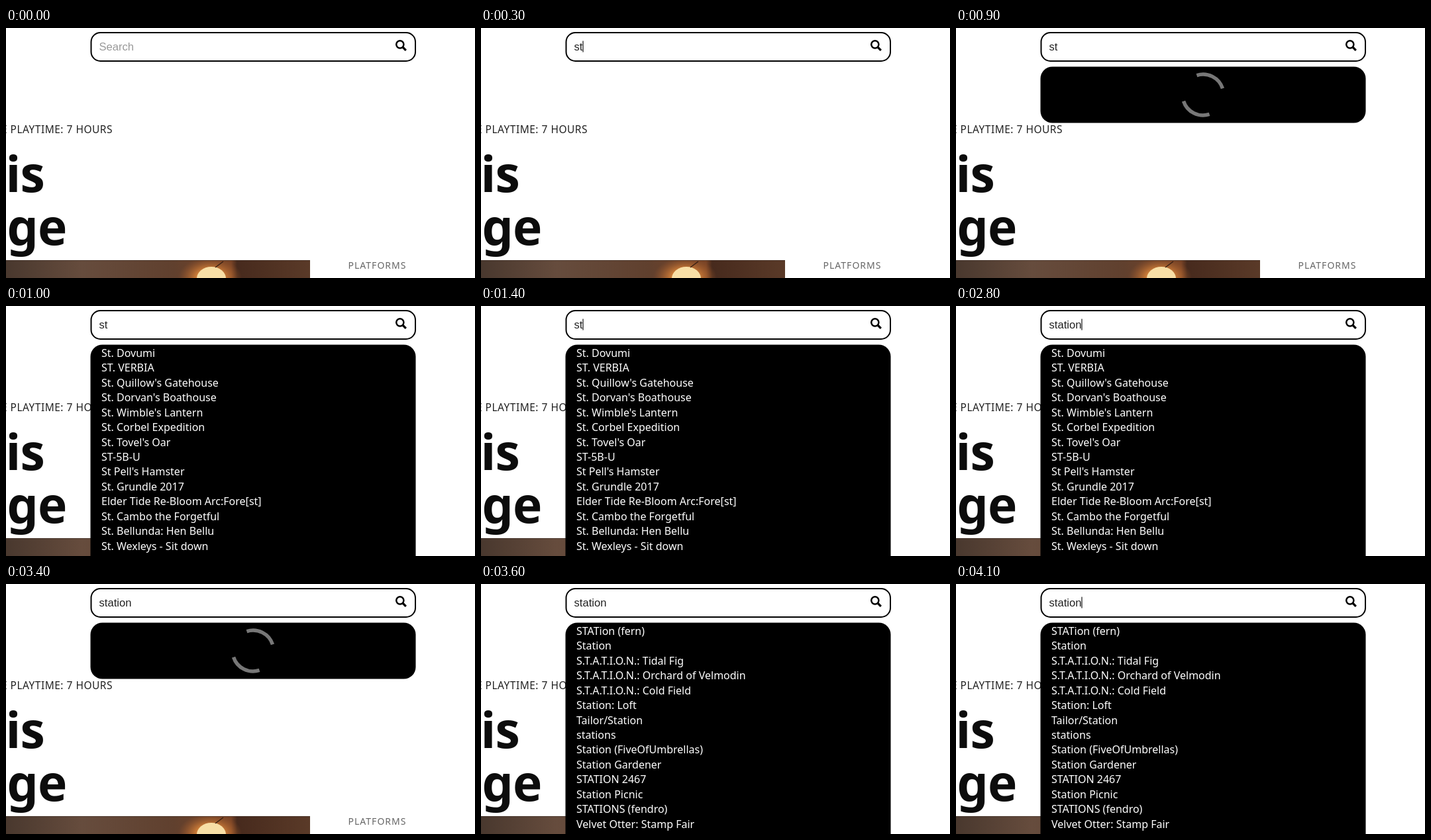
These frames come from a looping animation (708 by 378 pixels, 4200 ms). An HTML page:

```html
<!DOCTYPE html>
<html lang="en">
<head>
<meta charset="utf-8">
<title>Live search</title>
<style>
  html, body { margin: 0; width: 100%; height: 100%; overflow: hidden; background: #fff; }
  svg { display: block; width: 100%; height: 100%; font-family: "Noto Sans", sans-serif; }
  text { white-space: pre; }
  .heading { font-size: 75px; font-weight: 700; letter-spacing: -1px; fill: #0c0c0c; }
  .playtime { font-size: 15.5px; font-weight: 300; letter-spacing: .5px; fill: #222; text-anchor: end; }
  .label { font-size: 14px; font-weight: 300; letter-spacing: 1px; fill: #666; text-anchor: middle; }
  .field { font: 16.6px "Liberation Sans", Arial, sans-serif; }
  .results { font-size: 16px; fill: #fff; }
</style>
</head>
<body>
<svg viewBox="0 0 708 378">
  <defs>
    <linearGradient id="wall">
      <stop offset="0" stop-color="#49382e"/>
      <stop offset=".25" stop-color="#664c3d"/>
      <stop offset=".55" stop-color="#60402e"/>
      <stop offset=".74" stop-color="#7a4426"/>
      <stop offset=".76" stop-color="#472a1d"/>
      <stop offset="1" stop-color="#5a3a28"/>
    </linearGradient>
    <radialGradient id="glow">
      <stop offset=".35" stop-color="#e08a3c"/>
      <stop offset="1" stop-color="#a0582a" stop-opacity="0"/>
    </radialGradient>
  </defs>

  <text class="playtime" x="161" y="159">AVERAGE PLAYTIME: 7 HOURS</text>
  <text class="heading" x="-.5" y="248">is</text>
  <text class="heading" x="1.5" y="328">ge</text>
  <text class="label" x="560.5" y="364">PLATFORMS</text>

  <rect y="351" width="459" height="27" fill="url(#wall)"/>
  <svg y="351" width="459" height="27" viewBox="0 351 459 27">
    <ellipse cx="308" cy="377" rx="48" ry="30" fill="url(#glow)"/>
    <ellipse cx="310" cy="379" rx="22" ry="18" fill="#f8dfa6"/>
    <path d="M316 362l12-9" stroke="#3a2115" stroke-width="1.5"/>
    <path d="M0 351.5H459" stroke="#3a2a22" opacity=".6"/>
  </svg>

  <rect x="128.5" y="7" width="489.5" height="43" rx="14" fill="#fff" stroke="#000" stroke-width="2"/>
  <g fill="none" stroke="#000">
    <circle cx="594.8" cy="24.8" r="5.6" stroke-width="2.5"/>
    <path d="M599 29l4.8 4.8" stroke-width="3.2"/>
  </g>
  <text id="query" class="field" x="140.5" y="34"></text>
  <rect id="caret" y="19.5" width="1.2" height="17" fill="#111"/>

  <rect id="panel" x="127.5" y="58.5" width="491" rx="18"/>
  <circle id="spinner" cx="373" cy="101" r="31" fill="none" stroke="#777" stroke-width="5.5"
    pathLength="4" stroke-dasharray="1" transform="rotate(-108 373 101)"/>
</svg>

<script>
const LOOP = 4200;
const svg = document.querySelector("svg");
const [query, caret, panel, spinner] =
  ["query", "caret", "panel", "spinner"].map(id => document.getElementById(id));

function makeList(titles) {
  const group = document.createElementNS(svg.namespaceURI, "g");
  group.setAttribute("class", "results");
  titles.forEach((title, row) => {
    const line = document.createElementNS(svg.namespaceURI, "text");
    line.setAttribute("x", 144);
    line.setAttribute("y", 76.8 + row * 22.46);
    line.textContent = title;
    group.append(line);
  });
  return svg.appendChild(group);
}

const lists = {
  first: makeList([
    "St. Dovumi", "ST. VERBIA", "St. Quillow's Gatehouse", "St. Dorvan's Boathouse",
    "St. Wimble's Lantern", "St. Corbel Expedition", "St. Tovel's Oar", "ST-5B-U",
    "St Pell's Hamster", "St. Grundle 2017", "Elder Tide Re-Bloom Arc:Fore[st]",
    "St. Cambo the Forgetful", "St. Bellunda: Hen Bellu", "St. Wexleys - Sit down"
  ]),
  second: makeList([
    "STATion (fern)", "Station", "S.T.A.T.I.O.N.: Tidal Fig",
    "S.T.A.T.I.O.N.: Orchard of Velmodin", "S.T.A.T.I.O.N.: Cold Field", "Station: Loft",
    "Tailor/Station", "stations", "Station (FiveOfUmbrellas)", "Station Gardener",
    "STATION 2467", "Station Picnic", "STATIONS (fendro)", "Velvet Otter: Stamp Fair"
  ])
};

// Each track lists [start time in ms, value]; values hold until the next start.
const typed = [[0, ""], [100, "s"], [300, "st"], [2000, "sta"], [2600, "stat"],
  [2700, "statio"], [2800, "station"]];
const caretOn = [[0, false], [100, true], [900, false], [1400, true], [1900, false],
  [2000, true], [2400, false], [2600, true], [3400, false], [3900, true]];
const dropdown = [[0, "closed"], [900, "loading"], [1000, "first"], [3400, "loading"],
  [3500, "second"]];

const valueAt = (track, time) => track.findLast(([start]) => start <= time)[1];
const show = (element, visible) => element.style.display = visible ? "" : "none";

function draw(now) {
  const time = now % LOOP;
  const text = valueAt(typed, time);
  const state = valueAt(dropdown, time);

  query.textContent = text || "Search";
  query.setAttribute("fill", text ? "#222" : "#999");
  caret.setAttribute("x", 140.5 + query.getComputedTextLength());
  show(caret, valueAt(caretOn, time));

  show(panel, state !== "closed");
  panel.setAttribute("height", state === "loading" ? 85 : 400);
  show(spinner, state === "loading");
  for (const name in lists) show(lists[name], state === name);

  requestAnimationFrame(draw);
}

const begin = performance.now();
const tick = () => draw(performance.now() - begin);
requestAnimationFrame = (schedule => () => schedule(tick))(requestAnimationFrame.bind(window));
tick();
</script>
</body>
</html>
```
